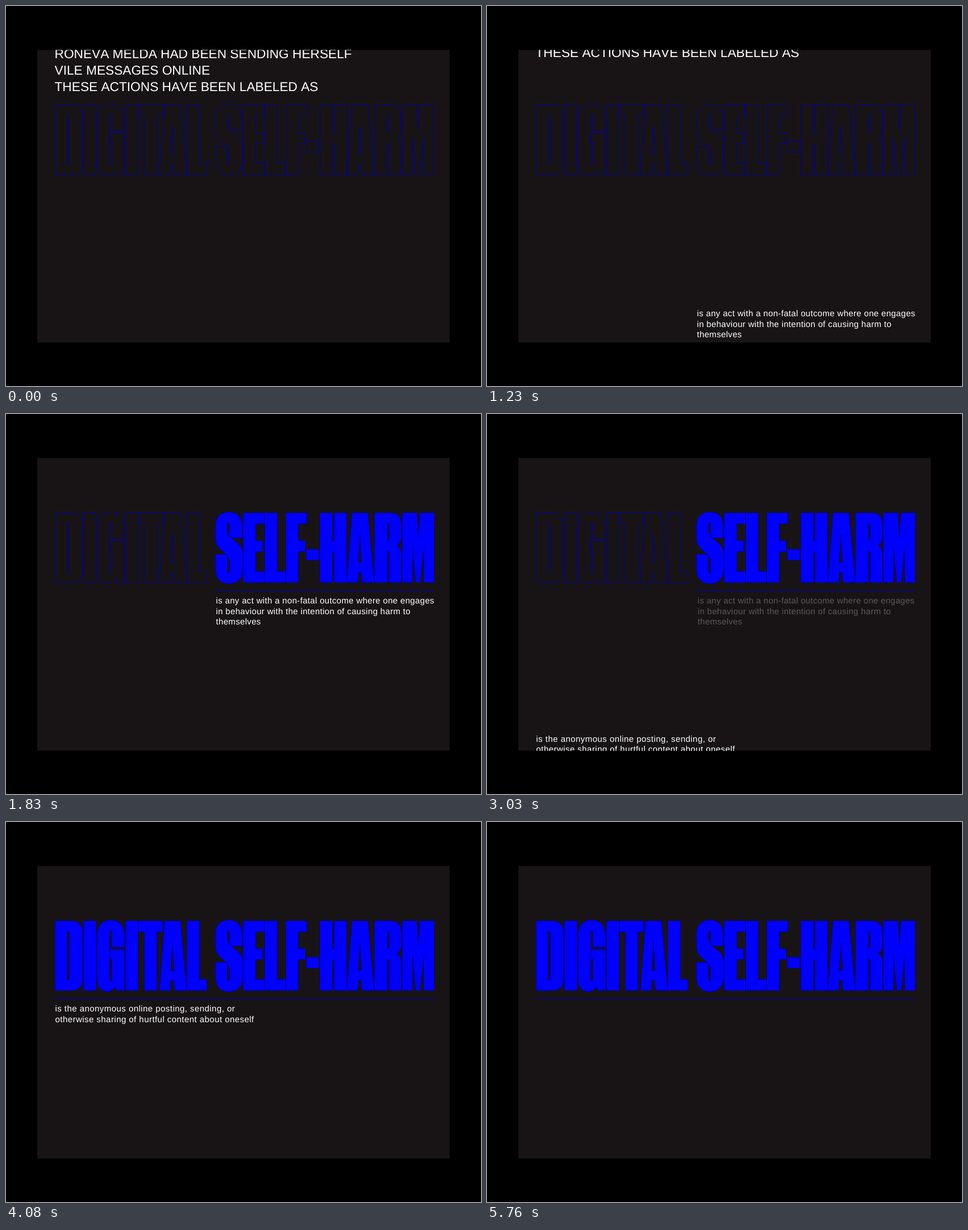
An HTML page that plays this animation: 836x670 px, repeating every 5790 ms.

```html
<!DOCTYPE html>
<html lang="en">
<head>
<meta charset="utf-8">
<title>Digital self-harm</title>
<style>
  html, body { margin: 0; width: 100%; height: 100%; overflow: hidden; background: #000; }
  svg { display: block; width: 836px; height: 670px; }
  text { fill: #fff; font-family: "Liberation Sans", Arial, sans-serif; font-kerning: none; text-rendering: geometricPrecision; }
  .intro text { font-size: 22.7px; }
  .note text { font-size: 15px; letter-spacing: .33px; }
  .posting text { letter-spacing: .45px; }
  .outline { fill: none; stroke: #0000aa; stroke-width: 1; }
  .fill { fill: #00f; fill-rule: evenodd; }
  .rule { fill: #0000b4; }

  .intro, .note, .fill, .rule { animation: 5790ms linear infinite; }
  .note { transform-box: fill-box; transform-origin: center; }
  .rule { transform-box: fill-box; transform-origin: right center; }
  .intro { animation-name: leave; }
  .harm { animation-name: harm; }
  .posting { animation-name: posting; }
  .fill.self { animation-name: fill-self; }
  .fill.digital { animation-name: fill-digital; }
  .rule.self { animation-name: rule-self; }
  .rule.digital { animation-name: rule-digital; }

  /* The opening scroll follows a plain t² curve. */
  @keyframes leave {
    0%, 12.21% { translate: 0 0; animation-timing-function: cubic-bezier(.333, 0, .667, .333); }
    31.52%, 100% { translate: 0 -273px; }
  }
  @keyframes harm {
    0%, 12.21% { translate: 0 273px; scale: 1; opacity: 1; animation-timing-function: cubic-bezier(.333, 0, .667, .333); }
    31.52%, 48.7% { translate: 0 0; scale: 1; opacity: 1; }
    53.89%, 100% { translate: 0 0; scale: .99; opacity: 0; }
  }
  @keyframes posting {
    0%, 50.1% { translate: 0 273px; scale: 1; opacity: 1; }
    52.33% { translate: 0 244px; }
    60.1% { translate: 0 96px; }
    62.18% { translate: 0 78px; animation-timing-function: ease-out; }
    69.1%, 93.78% { translate: 0 0; scale: 1; opacity: 1; }
    98.96%, 100% { translate: 0 0; scale: .99; opacity: 0; }
  }
  @keyframes fill-self {
    0%, 21.76% { opacity: 0; }
    31%, 100% { opacity: 1; }
  }
  @keyframes fill-digital {
    0%, 52.85% { opacity: 0; }
    59.4%, 100% { opacity: 1; }
  }
  @keyframes rule-self {
    0%, 21.76% { transform: scaleX(0); animation-timing-function: ease-in; }
    31.1%, 100% { transform: scaleX(1); }
  }
  @keyframes rule-digital {
    0%, 53.2% { transform: scaleX(0); animation-timing-function: ease-out; }
    64.2%, 100% { transform: scaleX(1); }
  }
</style>
</head>
<body>
<svg viewBox="0 0 836 670" role="img" aria-label="Digital self-harm">
  <defs>
    <clipPath id="panel"><rect x="55" y="77.5" width="726" height="515.7"/></clipPath>
    <path id="a" d="M279 174.5H307L318 297H296.5L295 278.5H290.5L289 297H270ZM292.8 211L296 262H290Z"/>
    <g id="digital">
      <path d="M86.5 174.5H115Q134.5 174.5 134.5 196V276Q134.5 297 115 297H86.5ZM107.5 192.5Q111.5 192.5 111.5 197V274Q111.5 279 107.5 279Z"/>
      <path d="M136.5 174.5H158.5V297H136.5Z"/>
      <path d="M208.5 220.5H186.5V196Q186.5 191 184.5 191Q182.5 191 182.5 197V276Q182.5 281 184.5 281Q186.5 281 186.5 275V241.5H183.5V224.5H208.5V297H195L192 291Q187 299 178 299Q160.5 299 160.5 272V203Q160.5 173 184 173Q208.5 173 208.5 203Z"/>
      <path d="M210.5 174.5H232.5V297H210.5Z"/>
      <path d="M233.5 174.5H275.5V193.5H265.5V297H243.5V193.5H233.5Z"/>
      <use href="#a"/>
      <path d="M318.5 174.5H340.5V277.5H353.5V297H318.5Z"/>
    </g>
    <g id="self">
      <path d="M415.5 218.5H393.5V197Q393.5 191 391.5 191Q389.5 191 389.5 197V203Q389.5 213 396 218L408 228Q416.5 236 416.5 249V271Q416.5 299 392 299Q368.5 299 368.5 271V247.5H389.5V275Q389.5 281 391.5 281Q393.5 281 393.5 275V260Q393.5 253 388 248L376 237Q368.5 230 368.5 217V200Q368.5 173 392 173Q415.5 173 415.5 200Z"/>
      <path d="M417.5 174.5H454.5V193.5H439.5V223.5H451.5V242.5H439.5V277.5H454.5V297H417.5Z"/>
      <path d="M455.5 174.5H477.5V277.5H491.5V297H455.5Z"/>
      <path d="M492.5 174.5H529.5V193.5H514.5V223.5H526.5V242.5H514.5V297H492.5Z"/>
      <path d="M528.5 238.5H550.5V257.5H528.5Z"/>
      <path d="M552.5 174.5H574.5V224.5H577.5V174.5H599.5V297H577.5V243.5H574.5V297H552.5Z"/>
      <use href="#a" x="330"/>
      <path d="M648.5 174.5H678Q695.5 174.5 695.5 195V215Q695.5 228 688 232Q695.5 236 695.5 248V297H674.5V247Q674.5 241.5 671.5 241.5V297H648.5ZM671.5 192.5Q674.5 192.5 674.5 197V219Q674.5 223.5 671.5 223.5Z"/>
      <path d="M697.5 174.5H723L725.5 219L728.5 174.5H753.5V297H735.5V231L729 297H721L715.5 231V297H697.5Z"/>
    </g>
  </defs>

  <rect width="836" height="670"/>
  <rect x="55" y="77.5" width="726" height="515.7" fill="#181415"/>

  <g clip-path="url(#panel)">
    <g class="intro">
      <text x="85.5" y="91.8">RONEVA MELDA HAD BEEN SENDING HERSELF</text>
      <text x="85.5" y="120.6">VILE MESSAGES ONLINE</text>
      <text x="85.5" y="150.2">THESE ACTIONS HAVE BEEN LABELED AS</text>
    </g>

    <use class="fill digital" href="#digital"/>
    <use class="fill self" href="#self"/>
    <use class="outline" href="#digital"/>
    <use class="outline" href="#self"/>
    <rect class="rule digital" x="86" y="310.3" width="283.5" height="1.3"/>
    <rect class="rule self" x="369" y="310.3" width="384" height="1.3"/>

    <g class="note harm">
      <text x="369.5" y="334">is any act with a non-fatal outcome where one engages</text>
      <text x="369.5" y="352.7">in behaviour with the intention of causing harm to</text>
      <text x="369.5" y="371.4">themselves</text>
    </g>
    <g class="note posting">
      <text x="86.5" y="334">is the anonymous online posting, sending, or</text>
      <text x="86.5" y="352.7">otherwise sharing of hurtful content about oneself</text>
    </g>
  </g>
</svg>
</body>
</html>
```
